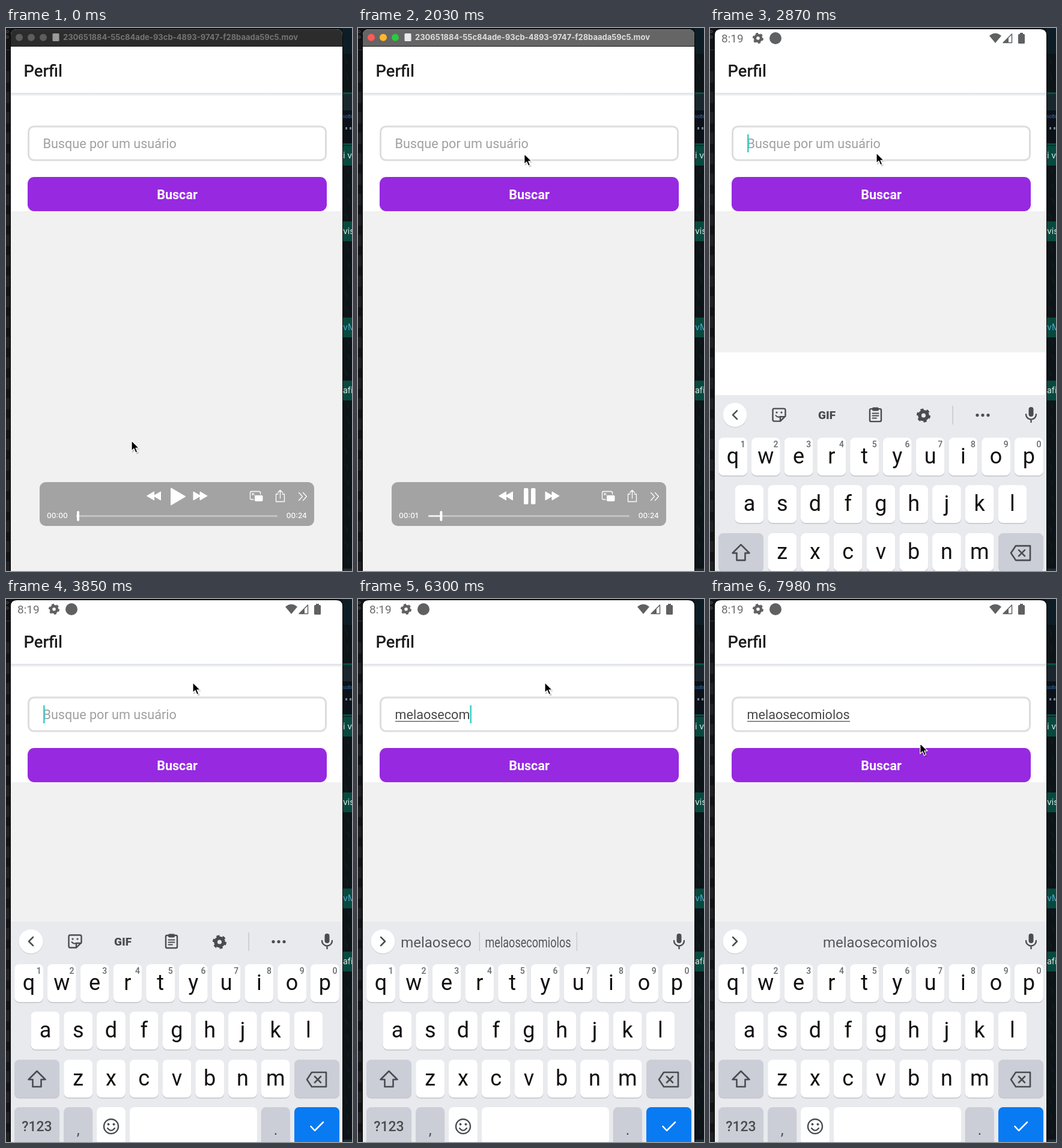
Write an HTML page that moves like this. It is 576x904 px and loops after 8000 ms.

```html
<!DOCTYPE html>
<html lang="pt">
<head>
<meta charset="utf-8">
<title>Perfil</title>
<style>
html, body { margin: 0; width: 100%; height: 100%; overflow: hidden; background: #0d1418; }
svg { display: block; width: 576px; height: 904px; font-family: Roboto, sans-serif; }
.ui { font-family: Inter, sans-serif; }
.line { fill: none; stroke-linecap: round; stroke-linejoin: round; }
</style>
</head>
<body>
<svg id="stage" viewBox="0 0 576 904" xmlns="http://www.w3.org/2000/svg"></svg>
<script>
const WORD = 'melaosecomiolos';
const ROOT_LEN = 9;
const FOCUS = 2400, PLAY = 700, ACTIVE = 560;
const TYPE_START = 4231, TYPE_STEP = 225, SUGGEST_LAG = 90;
const KEYS_START = 2700, KEYS_TIME = 290;

const rect = (x, y, w, h, fill, r = 0, more = '') =>
  `<rect x="${x}" y="${y}" width="${w}" height="${h}" rx="${r}" fill="${fill}" ${more}/>`;
const circle = (x, y, r, fill, more = '') =>
  `<circle cx="${x}" cy="${y}" r="${r}" fill="${fill}" ${more}/>`;
const text = (x, y, size, str, fill, more = '') =>
  `<text x="${x}" y="${y}" font-size="${size}" fill="${fill}" ${more}>${str}</text>`;
const line = (d, color, width, more = '') =>
  `<path class="line" d="${d}" stroke="${color}" stroke-width="${width}" ${more}/>`;
const shape = (d, fill, more = '') => `<path d="${d}" fill="${fill}" ${more}/>`;
const group = (id, body, more = '') => `<g id="${id}" ${more}>${body}</g>`;
const MID = 'text-anchor="middle"';

const gear = (x, y, r, color) =>
  circle(x, y, r * .56, 'none', `stroke="${color}" stroke-width="${r * .5}"`) +
  circle(x, y, r * .87, 'none',
    `stroke="${color}" stroke-width="${r * .27}" pathLength="12" stroke-dasharray="1 1"`);

function desktop() {
  let s = rect(0, 0, 576, 904, '#0d1418') + rect(0, 0, 9, 904, '#131315');
  for (let y = 72; y < 904; y += 34) s += rect(0, y, 6, 19, '#202023');
  s += rect(0, 36, 8, 1, '#333') +
    circle(2, 6, 2, 'none', 'stroke="#555"') + circle(2, 15, 2, 'none', 'stroke="#555"');
  s += rect(560, 0, 16, 43, '#0d1d26');
  for (let y = 50; y < 890; y += 26)
    s += line(`M${564 + y % 5} ${y}q6 4 3 10`, '#13242b', 1);
  s += rect(560, 107, 16, 3, '#064f43') + rect(560, 110, 16, 27, '#1a262d') +
    rect(560, 137, 16, 55, '#0b1119') + rect(560, 192, 16, 3, '#064f43') +
    text(560, 150, 8, 'soBr', '#3374bd', 'class="ui"') +
    rect(565, 165, 3, 4, '#76808a') + rect(572, 165, 3, 4, '#76808a');
  [[196, 'i v'], [322, 'visu'], [482, 'vM'], [587, 'afi']].forEach(([y, str], i) => {
    s += rect(560, y, 16, 33, '#07493f') +
      text(561, y + 21, 14, str, i == 2 ? '#4fa9cf' : '#dfe8e6', 'class="ui"');
  });
  return s + rect(560, 900, 16, 4, '#202c33');
}

function statusBar() {
  const c = '#5f6062';
  return text(19, 24, 19, '8:19', '#6b6c6e') + gear(80, 17, 9, c) + circle(109, 17, 10, c) +
    shape('M465 13Q475 4.500 485 13L475 25Z', c) +
    line('M488 24.500H502.500V10Z', c, 1.5) + shape('M488 25L497 16V25Z', c) +
    rect(513, 10, 11, 16, c, 1.5) + rect(516, 8, 5, 3, c);
}

function page() {
  return rect(8, 2, 552, 902, '#fff') + statusBar() +
    text(29.5, 81, 27.3, 'Perfil', '#1c1c1e', 'font-weight="500"') +
    rect(8, 108, 552, 5, 'url(#edge)') +
    rect(8, 305, 552, 599, '#f1f1f1', 0, 'id="body"') +
    rect(37.5, 164, 495, 56, '#fff', 9, 'stroke="#dddddd" stroke-width="3"') +
    text(61.5, 200, 21.6, 'Busque por um usuário', '#a0a0a0', 'id="hint"') +
    text(61.5, 200, 21.6, '', '#48484a', 'id="typed"') +
    rect(62, 203, 0, 1.2, '#48484a', 0, 'id="under"') +
    rect(62, 177, 2.6, 30, '#3dcfc8', 0, 'id="caret"') +
    rect(36, 248, 498, 57, '#9729e0', 11) +
    text(285, 285, 21.6, 'Buscar', '#fff', `${MID} font-weight="700"`);
}

function key(x, y, w, fill, label = '', size = 36) {
  return rect(x, y + 1.5, w, 63, '#c2c4ca', 8) + rect(x, y, w, 63, fill, 8) +
    text(x + w / 2, y + 43, size, label, '#111', MID);
}

function keyboard() {
  const ink = '#4a4c50', gray = '#cbced6', pitch = 54.75, w = 47.8;
  const col = i => 14.2 + pitch * i;
  let s = rect(8, 537, 552, 460, '#e9eaee');
  [...'qwertyuiop'].forEach((c, i) => {
    s += key(col(i), 608, w, '#fff', c) +
      text(col(i) + 40.5, 624, 14, (i + 1) % 10, '#66686c', `${MID} font-weight="500"`);
  });
  [...'asdfghjkl'].forEach((c, i) => s += key(col(i + .5), 687, w, '#fff', c));
  [...'zxcvbnm'].forEach((c, i) => s += key(col(i + 1.5), 767, w, '#fff', c));
  s += key(14, 767, 75, gray) + key(480, 767, 75, gray) + key(14, 846, 75, gray) +
    key(col(1.5), 846, w, gray) + key(col(2.5), 846, w, '#fff') + key(206, 846, 212, '#fff') +
    key(col(7.5), 846, w, gray) + key(480, 846, 75, '#087af2');
  s += line('M51.500 786L65.500 800H58.500V812H44.500V800H37.500Z', ink, 2.6) +
    line('M509 788H533V812H509L501 800ZM514 795L524 805M524 795L514 805', ink, 2.6) +
    text(51.5, 886, 23, '?123', ink, `${MID} font-weight="500"`) +
    text(120.3, 892, 25, ',', ink, MID) + text(449, 892, 25, '.', ink, MID) +
    circle(175, 878, 12, 'none', `stroke="${ink}" stroke-width="2.4"`) +
    circle(170.5, 874.5, 1.9, ink) + circle(179.5, 874.5, 1.9, ink) +
    line('M169 881Q175 888.500 181 881', ink, 2.2) +
    line('M507.500 878L514 885L528 871', '#fff', 2.5);
  s += circle(41.5, 571.2, 20.3, '#d2d4d9') + circle(41.5, 570, 20, '#fff') +
    line('M45 563L38 570L45 577', ink, 2.5, 'id="chevron"');
  s += rect(530.5, 557, 8, 16, ink, 4) + line('M526 569A8.500 8.500 0 0 0 543 569M534.500 577.500V582', ink, 2.4);
  s += group('tools',
    line('M107 559.500H123Q125.500 559.500 125.500 562V572L117 580.500H107Q104.500 580.500 104.500 578V562Q104.500 559.500 107 559.500ZM117 580V573H125', ink, 2.4) +
    circle(111, 566, 1.6, ink) + circle(119, 566, 1.6, ink) + line('M109.500 571Q113 575 116 573', ink, 2) +
    text(194.5, 576.500, 19, 'GIF', ink, `${MID} font-weight="900"`) +
    rect(266, 560, 19, 21, 'none', 2, `stroke="${ink}" stroke-width="2.4"`) +
    rect(270, 557.5, 11, 6, ink, 2) +
    line('M270.500 567.500H280.500M270.500 571.500H280.500M270.500 575.500H277', ink, 2) +
    gear(355.5, 571, 11.5, ink) + rect(403.5, 555, 1.5, 31, '#c5c7cc') +
    [445, 454, 463].map(x => circle(x, 570.5, 2.6, ink)).join(''));
  const tip = (id, x) => `<g transform="translate(${x} 580)">` +
    text(0, 0, 24, '', '#54575c', `id="${id}" ${MID}`) + '</g>';
  s += group('tips', tip('tipA', 130) + tip('tipB', 283) +
    group('bars', rect(201.7, 554, 1.2, 32, '#c5c7cc') + rect(363.7, 554, 1.2, 32, '#c5c7cc')));
  return group('keys', s);
}

function titleBar() {
  return rect(8, 2, 552, 28.5, '#2c2c2c', 0, 'id="bar"') +
    rect(8, 2, 552, 1, '#fff', 0, 'opacity=".15"') + rect(8, 30, 552, 1, '#151515') +
    [22, 42, 62].map(x => circle(x, 15.7, 6, '#5d5d5d', 'class="light"')).join('') +
    rect(77.5, 9, 11, 13, '#9a9a9a', 1.5, 'id="doc"') +
    text(95, 20, 13, '230651884-55c84ade-93cb-4893-9747-f28baada59c5.mov', '#747474',
      'id="name" class="ui" font-weight="700"');
}

function player() {
  const double = x => shape(`M${x} 779L${x + 12} 772V786ZM${x + 11} 779L${x + 23} 772V786Z`, '#fff',
    'stroke="#fff" stroke-linejoin="round"');
  return rect(56, 756, 457, 73, '#a3a3a3', 10) +
    double(234.5) + `<g transform="matrix(-1 0 0 1 569.500 0)">${double(234.5)}</g>` +
    shape('M275 766.500L298 780L275 793.500Z', '#fff', 'id="play" stroke="#fff" stroke-width="2" stroke-linejoin="round"') +
    group('pause', rect(276, 766, 7.5, 27, '#fff', 2) + rect(288, 766, 7.5, 27, '#fff', 2)) +
    line('M412 785H409Q406.500 785 406.500 782.500V774Q406.500 771.500 409 771.500H421Q423.500 771.500 423.500 774V776', '#fff', 1.3) +
    rect(414, 778, 13.5, 10, '#fff', 2) + line('M410 775L414 778M410 778V775H413', '#fff', 1) +
    line('M453 776H449.500V788.500H463.500V776H460M456.500 783V770M452.500 773.500L456.500 769.500L460.500 773.500', '#fff', 1.3) +
    line('M487.500 773.500L493.500 780L487.500 786.500M494.500 773.500L500.500 780L494.500 786.500', '#fff', 1.3) +
    text(68, 816, 12, '', '#fff', 'id="clock" class="ui" font-weight="500"') +
    text(501, 816, 12, '00:24', '#fff', 'class="ui" font-weight="500" text-anchor="end"') +
    rect(117, 811, 335, 3, '#c3c3c3', 1.5) + rect(117, 811, 3, 3, '#eee', 1.5, 'id="done"') +
    rect(118, 804, 4, 17, '#fff', 2, 'id="knob"');
}

document.getElementById('stage').innerHTML =
  `<defs><clipPath id="win"><path d="M8 904V12Q8 2 18 2H550Q560 2 560 12V904Z"/></clipPath>
  <linearGradient id="edge" x2="0" y2="1"><stop stop-color="#dcdfe5"/><stop offset="1" stop-color="#f7f8f9"/></linearGradient></defs>` +
  desktop() + rect(7, 1, 554, 920, '#050607', 11) +
  `<g clip-path="url(#win)">` + page() + keyboard() +
  group('title', titleBar()) + group('player', player()) + '</g>' +
  group('cursor', shape('M1 2V20L5.500 16L8.500 22.500L12 21L9 14.500H14Z', '#000', 'opacity=".2"') +
    shape('M0 0V17L4 13.300L6.800 20L9.800 18.700L7 12.300H12.300Z', '#000',
      'stroke="#fff" stroke-width="1.2" stroke-linejoin="round"'));

const $ = id => document.getElementById(id);
const set = (id, name, value) => $(id).setAttribute(name, value);
const show = (id, on) => set(id, 'visibility', on ? 'visible' : 'hidden');
const clamp = v => Math.max(0, Math.min(1, v));
const easeIn = p => p * p, easeOut = p => p * (2 - p), easeBoth = p => p * p * (3 - 2 * p);

// start, end, x, y, easing
const moves = [
  [0, 1, 209, 687, easeBoth],
  [PLAY, 1190, 244, 483, easeIn],
  [1190, 2100, 277, 208, easeOut],
  [3100, 3600, 311, 139, easeBoth],
  [7500, 8000, 350, 241, easeBoth]
];
function cursorAt(t) {
  let x = 209, y = 687;
  for (const [from, to, tx, ty, ease] of moves) {
    const p = ease(clamp((t - from) / (to - from)));
    x += (tx - x) * p;
    y += (ty - y) * p;
  }
  return `${x} ${y}`;
}

const typedBy = t => Math.max(0, Math.min(WORD.length, Math.floor((t - TYPE_START) / TYPE_STEP) + 1));

function suggest(id, str, room) {
  const el = $(id);
  el.textContent = str;
  const w = str ? el.getComputedTextLength() : 0;
  el.setAttribute('transform', `scale(${w > room ? room / w : 1} 1)`);
}

function drawTyping(t) {
  const n = typedBy(t), known = typedBy(t - SUGGEST_LAG), typed = $('typed');
  typed.textContent = WORD.slice(0, n);
  show('hint', !n);
  set('under', 'width', known ? typed.getSubStringLength(0, known) : 0);
  const last = n ? TYPE_START + (n - 1) * TYPE_STEP : FOCUS;
  set('caret', 'x', n ? 61.5 + typed.getComputedTextLength() : 62);
  show('caret', t >= FOCUS && (t - last) % 1000 < 500);

  const pair = known >= ROOT_LEN && known < WORD.length;
  show('tools', !known);
  show('tips', known);
  show('bars', pair);
  suggest('tipA', pair ? WORD.slice(0, known) : '', 143);
  suggest('tipB', pair ? WORD : WORD.slice(0, known), pair ? 143 : 300);
  set('chevron', 'transform', known ? 'rotate(180 41.500 570)' : '');
}

function drawWindow(t) {
  const on = t >= ACTIVE, playing = t >= PLAY;
  const seconds = Math.max(0, t - PLAY) / 1000, x = 120 + seconds * 13.83;
  const fade = 1 - clamp((t - 2170) / 430);
  set('title', 'opacity', fade);
  set('player', 'opacity', fade);
  set('bar', 'fill', on ? '#656565' : '#2c2c2c');
  set('name', 'fill', on ? '#dedede' : '#747474');
  set('doc', 'fill', on ? '#e8eaed' : '#9a9a9a');
  document.querySelectorAll('.light').forEach((el, i) =>
    el.setAttribute('fill', on ? ['#fc5b57', '#fdb82c', '#2bc840'][i] : '#5d5d5d'));
  set('play', 'visibility', playing ? 'hidden' : 'inherit');
  set('pause', 'visibility', playing ? 'inherit' : 'hidden');
  $('clock').textContent = '00:' + String(Math.round(seconds)).padStart(2, '0');
  set('done', 'width', x - 117);
  set('knob', 'x', x - 2);
}

function draw(t) {
  drawWindow(t);
  drawTyping(t);
  const p = clamp((t - KEYS_START) / KEYS_TIME);
  set('keys', 'transform', `translate(0 ${440 * (1 - easeOut(p))})`);
  set('body', 'height', p ? 235 : 599);
  set('cursor', 'transform', `translate(${cursorAt(t)})`);
}

const begin = performance.now();
function tick() {
  draw((performance.now() - begin) % 8000);
  requestAnimationFrame(tick);
}
tick();
</script>
</body>
</html>
```
